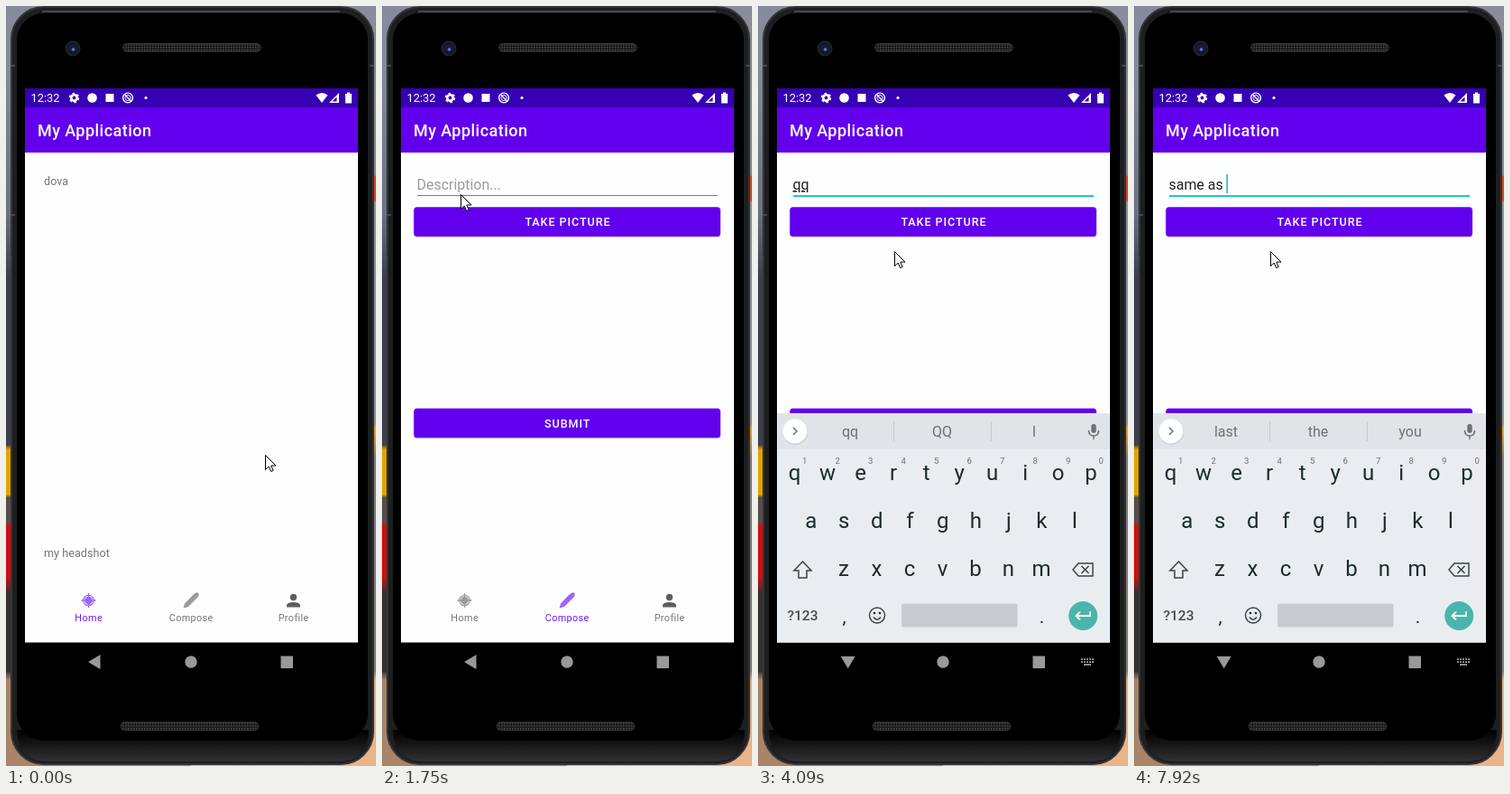
An HTML page that plays this animation: 410 by 840 pixels, repeating every 8 s.

```html
<!DOCTYPE html>
<html lang="en">
<head>
<meta charset="utf-8">
<title>Compose post</title>
<style>
  html, body { margin: 0; width: 410px; height: 840px; overflow: hidden; }
  body {
    background:
      linear-gradient(#878b9c 60px, #6c7080 230px, #3d404a 300px 485px, #e2a400 490px 540px, #55504c 543px 570px, #d30f12 575px 630px, #33302f 650px 735px, #a98468 745px) 0 0 / 205px 100% no-repeat,
      linear-gradient(#8a8d99 187px, #f0401c 188px 215px, #9698a0 217px 462px, #e0a32a 465px 474px, #85807e 500px 735px, #e9b488 745px) 205px 0 / 205px 100% no-repeat;
  }
  svg { display: block; }
  text { font-family: Roboto, sans-serif; white-space: pre; }
  .mid { text-anchor: middle; }
  .button { font-size: 12.57px; font-weight: 500; letter-spacing: .95px; fill: #fff; }
  .body { font-size: 12.57px; letter-spacing: .05px; fill: #757575; }
  .label { font-size: 10.8px; letter-spacing: .4px; }
  .field { font-size: 15.95px; }
  .word { text-decoration: underline 1px; text-decoration-skip-ink: none; }
  .line { fill: none; stroke: currentColor; stroke-width: 1.5; }
  #strip { font-size: 16px; color: #6a7277; fill: #6a7277; }
  #keys { font-size: 24px; fill: #1c2b33; color: #37444b; }
</style>
</head>
<body>
<svg width="410" height="840" viewBox="0 0 410 840">
  <defs>
    <linearGradient id="chin" x2="0" y2="1"><stop offset="0" stop-color="#000"/><stop offset="1" stop-color="#303030"/></linearGradient>
    <pattern id="mesh" width="3" height="3" patternUnits="userSpaceOnUse"><path d="M0 0h3v3H0z" fill="#1c1c1c"/><path d="M0 0h1.5v1.5H0z" fill="#484848"/></pattern>
    <clipPath id="navClip"><path d="M21 639h369v50H21z"/></clipPath>
  </defs>

  <!-- phone -->
  <rect x="6" y="1" width="401" height="837" rx="36" fill="#1d1e1f" stroke="#343537" stroke-width="2"/>
  <path d="M12 800h390q0 35-34 35H46q-34 0-34-35z" fill="url(#chin)"/>
  <rect x="12" y="8" width="389" height="804" rx="30" fill="#000"/>
  <path d="M40 6h330" stroke="#55575a" stroke-width="1.500"/>
  <path d="M5 66h5M5 231h5M403 66h5" stroke="#55575a" stroke-width="1.500"/>
  <circle cx="74" cy="47" r="8" fill="#191a20" stroke="#292a2f"/>
  <circle cx="74" cy="47" r="4" fill="#101b46"/><circle cx="74.500" cy="48" r="1.800" fill="#5b78d6"/>
  <g fill="url(#mesh)" stroke="#333"><rect x="129.500" y="41.500" width="153" height="9" rx="4.500"/><rect x="127" y="791.500" width="153" height="9" rx="4.500"/></g>

  <!-- screen -->
  <path d="M21 91h369v612.500H21z" fill="#fefefe"/>
  <path d="M21 91h369v21H21z" fill="#3700b3"/>
  <path d="M21 112h369v50H21z" fill="#6200ee"/>
  <g fill="#fff">
    <text x="27.500" y="106.300" font-size="12.900">12:32</text>
    <circle cx="75.500" cy="101.500" r="3.200" fill="none" stroke="#fff" stroke-width="2.600"/>
    <circle cx="75.500" cy="101.500" r="5" fill="none" stroke="#fff" stroke-width="1.600" stroke-dasharray="2.600 2.636"/>
    <circle cx="95.500" cy="101.500" r="5.300"/>
    <path d="M110.500 97h9v9h-9z"/>
    <circle cx="135" cy="101.500" r="5.400" fill="none" stroke="#fff" stroke-width="1.400"/>
    <circle cx="135" cy="101.500" r="3" fill="none" stroke="#fff"/><path d="M131 97.500l8 8" stroke="#fff" stroke-width="1.300"/>
    <circle cx="155" cy="101.500" r="1.600"/>
    <path d="M343.500 98.500q6.500-5 13 0L350 107zM369 96v11h-11zM376 97h2v-1.500h3V97h2v10.500h-7z"/>
    <path d="M366.500 100.500v5h-5z" fill="#3700b3"/>
    <text x="35" y="144.300" font-size="18" font-weight="500" letter-spacing=".45">My Application</text>
  </g>

  <g id="home" class="body"><text x="42" y="198">dova</text><text x="42" y="608.500">my headshot</text></g>

  <g id="compose">
    <path d="M39 209.500h333" stroke="#7b7b7b"/>
    <path id="focus" d="M39 210h333" stroke="#1fc9bd" stroke-width="1.800"/>
    <text id="hint" class="field" x="38.500" y="203" fill="#9c9c9c">Description...</text>
    <text class="field" x="38.500" y="203" fill="#222"><tspan id="done"></tspan><tspan id="word" class="word"></tspan></text>
    <path id="caret" stroke="#14b8ac" stroke-width="1.500"/>
    <g fill="#000" opacity=".12"><rect x="35" y="223" width="340.500" height="33" rx="4"/><rect x="35" y="445.500" width="340.500" height="33" rx="4"/></g>
    <g fill="#6200ee"><rect x="35.300" y="222.300" width="339.700" height="32.400" rx="3.500"/><rect x="35.300" y="444.800" width="339.700" height="32.400" rx="3.500"/></g>
    <g class="button mid"><text x="206" y="243.300">TAKE PICTURE</text><text x="205.700" y="466">SUBMIT</text></g>
  </g>

  <!-- bottom tabs -->
  <circle id="ripple" clip-path="url(#navClip)"/>
  <g id="homeTab">
    <g stroke="currentColor" fill="none"><circle cx="91.500" cy="657" r="5.700" stroke-width="1.300"/><circle cx="91.500" cy="657" r="4.200" fill="currentColor" stroke="none"/><path d="M83.500 657h16M91.500 649v16" stroke-width="1.300"/></g>
    <text class="label mid" x="91.700" y="680.300">Home</text>
  </g>
  <g id="composeTab">
    <path d="M196.500 665.500l1.500-5 9-9.500q3.500-3.500 6-2.500 2 2.500-1.500 6l-9.500 9.500z" fill="currentColor"/>
    <text class="label mid" x="205.200" y="680.300">Compose</text>
  </g>
  <g fill="#5e5e5e"><circle cx="318.500" cy="653.500" r="3.700"/><path d="M311 664.500v-2q0-3.500 7.500-3.500t7.500 3.500v2z"/></g>
  <text class="label mid" x="318.700" y="680.300" fill="#757575">Profile</text>

  <!-- system navigation -->
  <g fill="#999">
    <path id="back" d="M91 725l13.500-8v16z"/>
    <circle cx="205" cy="725" r="6.700"/><path d="M304.500 718.500h13.500v13.500h-13.500z"/>
    <g id="switcher" stroke="#999" fill="none"><path d="M358 722h14M358 725h14" stroke-width="1.800" stroke-dasharray="1.800 1.250"/><path d="M361 728h8" stroke-width="1.800"/></g>
  </g>

  <g id="keyboard">
    <path d="M21 450h369v253.500H21z" fill="#e9edf0"/>
    <path d="M21 450h369v40H21z" fill="#e0e4e8"/>
    <g id="strip">
      <circle cx="41.500" cy="471" r="13.700" fill="#c9cdd0"/><circle cx="41" cy="470" r="13.500" fill="#fff"/>
      <path id="chevron" class="line" d="M39 466l4 4-4 4"/>
      <g id="tools">
        <circle class="line" cx="89.500" cy="468.500" r="4.700"/><path class="line" d="M93 472l5.500 5.500"/>
        <path class="line" d="M139.500 463.500h11.500v8l-5 5h-6.500zM151 471h-5v5M142 470q3 4 5 1"/><path d="M142 466h1.600v2H142zM147 466h1.600v2H147z"/>
        <text class="mid" x="198.500" y="474.500" font-size="12" font-weight="900" letter-spacing=".8">GIF</text>
        <path d="M247 463h14v14h-14z"/><path class="line" d="M286 459v22" style="color:#cbcfd2;stroke-width:1"/>
        <circle cx="313.500" cy="470" r="1.800"/><circle cx="319" cy="470" r="1.800"/><circle cx="324.500" cy="470" r="1.800"/>
      </g>
      <g id="suggestions" class="mid">
        <text x="102" y="476"></text><text x="204" y="476"></text><text x="306" y="476"></text>
        <path class="line" d="M150.500 459v22M258.500 459v22" style="color:#c6cace;stroke-width:1"/>
      </g>
      <rect x="369.300" y="462" width="5.400" height="10" rx="2.700"/><path class="line" d="M366.500 469q0 6 5.500 6t5.500-6M372 475v4"/>
    </g>
    <g id="keys" class="mid">
      <g id="letters"></g>
      <text x="49.500" y="679" font-size="15.500" fill="#414c52" font-weight="500">?123</text><text x="95.500" y="681.500" font-size="21">,</text><text x="314.500" y="681.500" font-size="21">.</text>
      <path class="line" d="M49.500 614l9.500 10h-5v8h-9v-8h-5z"/>
      <path class="line" d="M355 616h16v14h-16l-6-7zM358.500 619l8 8M366.500 619l-8 8"/>
      <circle class="line" cx="132" cy="673.500" r="8.500"/><path class="line" d="M128 675.500q4 5.500 8 0"/>
      <circle cx="129" cy="671" r="1.300"/><circle cx="135" cy="671" r="1.300"/>
      <rect x="159" y="660.500" width="128.500" height="26" rx="2" fill="#c8ccce"/>
      <circle cx="360.200" cy="674" r="16" fill="#4bb5aa"/>
      <path class="line" d="M368 669v5h-15M357 669.500l-4.500 4.500 4.500 4.500" style="color:#fff;stroke-width:1.800"/>
    </g>
  </g>

  <path id="mouse" d="M.5.5v16l3.700-3.500 2.500 5.500 2.500-1.100-2.400-5.400H12z" fill="#fff" stroke="#000"/>
</svg>

<script>
const LOOP = 8000;
const $ = id => document.getElementById(id);
const show = (id, on) => $(id).style.display = on ? '' : 'none';

// Each step changes only the listed properties.
const steps = [
  [0, { mouse: [287, 496], page: 'home', ripple: null, focus: 0, caret: 0, angle: 0, switcher: 0, keyboard: null, text: '', words: null }],
  [250, { mouse: [262, 567] }],
  [370, { mouse: [236, 636] }],
  [520, { mouse: [224, 668] }],
  [800, { ripple: [215.5, 666, 44.5, '#e2e2e2'] }],
  [950, { page: 'compose', ripple: [205.3, 664, 62, '#d6d6d6'] }],
  [1080, { ripple: null }],
  [1480, { mouse: [168, 440] }],
  [1600, { mouse: [111, 239] }],
  [1750, { mouse: [87, 208] }],
  [1900, { mouse: [86, 199] }],
  [2050, { caret: 1, focus: .3 }],
  [2170, { focus: .6 }],
  [2320, { focus: .8, switcher: 1, angle: -25 }],
  [2440, { mouse: [100, 215], focus: 1, angle: -110 }],
  [2560, { mouse: [117, 233], angle: -180 }],
  [2710, { mouse: [232, 262], caret: 0, angle: -110 }],
  [2830, { mouse: [149, 271], angle: -90 }],
  [3110, { caret: 1 }],
  [3420, { keyboard: [15, .8] }],
  [3540, { keyboard: [0, 1], mouse: [151, 271] }],
  [3690, { text: 'q', words: ['q', 'Q', 'I'] }],
  [4090, { text: 'qq', words: ['qq', 'QQ', 'I'], caret: 0 }],
  [4210, { text: 'q', words: ['q', 'Q', 'I'], caret: 1 }],
  [4330, { text: '' }],
  [4450, { words: ['', '', ''] }],
  [4600, { words: null }],
  [4750, { text: 's' }],
  [4900, { text: 'sa', words: ['sa', 'say', 'same'] }],
  [5150, { text: 'sam', words: ['sam', 'Sam', 'same'] }],
  [5270, { text: 'same', words: ['same', 'sane', 'some'] }],
  [5390, { text: 'same ', words: ['as', 'thing', 'time'] }],
  [5690, { text: 'same as', words: ['as', 'at', 'and'] }],
  [5840, { text: 'same as ', words: ['last', 'the', 'you'] }],
  [6400, { caret: 0 }],
  [6970, { caret: 1 }],
  [7370, { caret: 0 }],
  [7920, { caret: 1 }],
];

const rows = [['qwertyuiop', 40.6, 524], ['asdfghjkl', 58.8, 576.5], ['zxcvbnm', 95, 630]];
$('letters').innerHTML = rows.map(([row, left, y], r) => [...row].map((key, i) => {
  const x = left + i * 36.5;
  const digit = r ? '' : `<text x="${x + 11}" y="505.5" font-size="9.5" fill="#6a7277">${(i + 1) % 10}</text>`;
  return `<text x="${x}" y="${y}">${key}</text>${digit}`;
}).join('')).join('');

function setTab(id, selected) {
  $(id).style.color = selected ? '#9d66f3' : '#9b9b9b';
  $(id).style.fill = selected ? '#6f1aef' : '#757575';
}

function drawField({ text, focus, caret }) {
  const split = text.lastIndexOf(' ') + 1;
  $('done').textContent = text.slice(0, split);
  $('word').textContent = text.slice(split);
  show('hint', !text);
  $('focus').style.opacity = focus;
  show('caret', caret);
  const x = 39 + (text && $('done').parentNode.getComputedTextLength());
  $('caret').setAttribute('d', `M${x} 186v21`);
}

function drawKeyboard({ keyboard, words }) {
  show('keyboard', keyboard);
  if (!keyboard) return;
  const [drop, opacity] = keyboard;
  $('keyboard').setAttribute('transform', `translate(0 ${drop})`);
  $('keyboard').style.opacity = opacity;
  show('tools', !words);
  show('suggestions', words);
  $('chevron').setAttribute('transform', words ? '' : 'rotate(180 41 470)');
  if (words) $('suggestions').querySelectorAll('text').forEach((el, i) => el.textContent = words[i]);
}

function draw(time) {
  const state = Object.assign({}, ...steps.filter(([start]) => start <= time).map(([, change]) => change));
  const home = state.page === 'home';
  show('home', home);
  show('compose', !home);
  setTab('homeTab', home);
  setTab('composeTab', !home);
  show('ripple', state.ripple);
  if (state.ripple) ['cx', 'cy', 'r', 'fill'].forEach((name, i) => $('ripple').setAttribute(name, state.ripple[i]));
  drawField(state);
  drawKeyboard(state);
  show('switcher', state.switcher);
  $('back').setAttribute('transform', `rotate(${state.angle} 99 724.3)`);
  $('mouse').setAttribute('transform', `translate(${state.mouse})`);
}

const origin = performance.now();
function tick() {
  draw((performance.now() - origin) % LOOP);
  requestAnimationFrame(tick);
}
tick();
</script>
</body>
</html>
```
